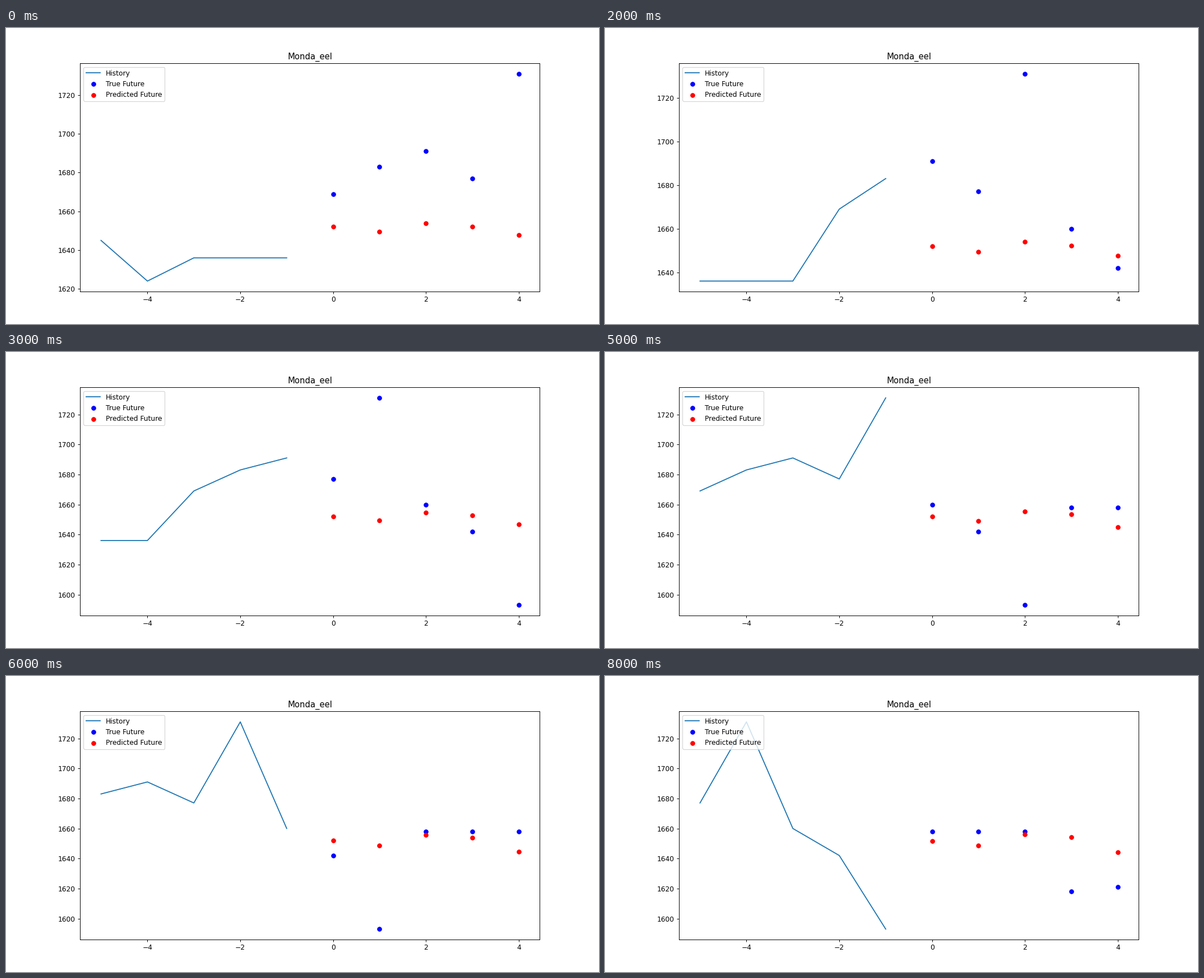
Write a matplotlib script that moves like this. It is 1058x529 px and loops after 9 s.

```python
import numpy as np
import matplotlib.pyplot as plt
from matplotlib.animation import FuncAnimation

WINDOW = 5
TITLE = "Monda_eel"

# Observed values; each step slides the window one place along.
SERIES = [1645, 1624, *[1636] * 3, 1669, 1683, 1691, 1677,
          1731, 1660, 1642, 1593, *[1658] * 3, 1618, 1621]
STEPS = len(SERIES) - 2 * WINDOW + 1

# The forecast drifts smoothly from its first shape to its last.
FIRST = np.array([1652.0, 1649.6, 1653.9, 1652.0, 1647.9])
LAST = np.array([1651.8, 1648.7, 1656.0, 1654.2, 1644.0])

past = np.arange(-WINDOW, 0)
future = np.arange(WINDOW)

fig, ax = plt.subplots(figsize=(12, 6), dpi=1058 / 12)


def ease(t):
    return t ** 3 * (10 - 15 * t + 6 * t * t)


def forecast(step):
    return FIRST + (LAST - FIRST) * ease(step / (STEPS - 1))


def draw(step):
    ax.clear()
    values = SERIES[step:step + 2 * WINDOW]
    ax.plot(past, values[:WINDOW], label="History")
    ax.scatter(future, values[WINDOW:], color="blue", label="True Future")
    ax.scatter(future, forecast(step), color="red", label="Predicted Future")
    ax.set_title(TITLE)
    ax.legend(loc="upper left")


anim = FuncAnimation(fig, draw, frames=STEPS, init_func=lambda: draw(0),
                     interval=1000, repeat=True, repeat_delay=0)
plt.show()
```
